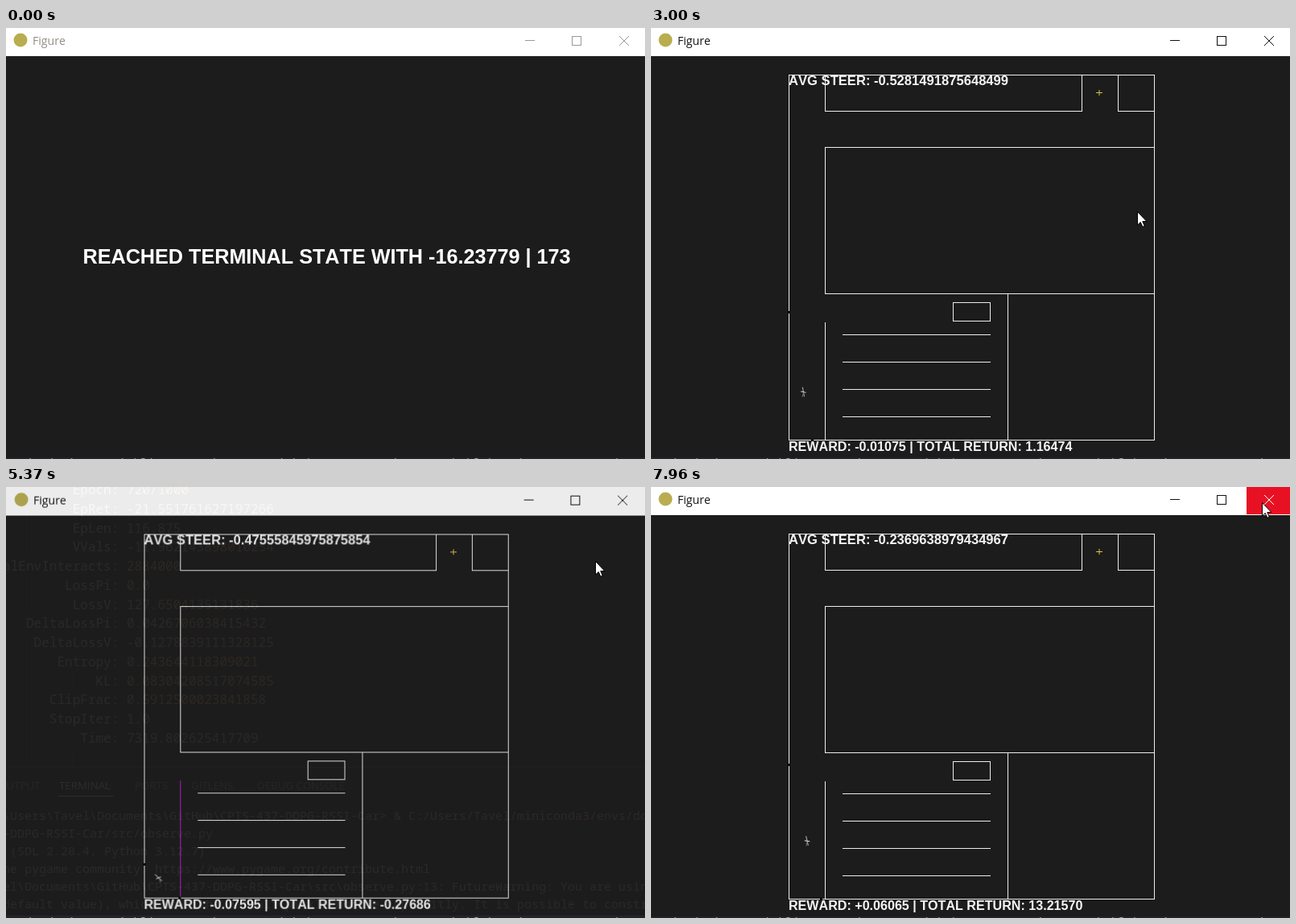
An HTML page with a canvas that plays this animation: 794 by 536 pixels, repeating every 8000 ms.

```html
<!DOCTYPE html>
<html lang="en">
<head>
<meta charset="utf-8">
<title>Figure</title>
<style>
html, body { margin: 0; width: 100%; height: 100%; overflow: hidden; background: #23272e; }
canvas { display: block; }
</style>
</head>
<body>
<canvas id="stage" width="794" height="536"></canvas>
<script>
const LOOP = 8000, STEP = 70, PAD = 8;
const W = 794, H = 536, WIN_H = 534, BAR = 35;
const ctx = document.getElementById('stage').getContext('2d');
const layer = document.createElement('canvas');
layer.width = W + 2 * PAD;
layer.height = WIN_H + PAD;
const win = layer.getContext('2d');

const MONO = '"Noto Sans Mono", "DejaVu Sans Mono", monospace';
const UI = '"Open Sans", "Noto Sans", sans-serif';
const BOLD = '"Liberation Sans", Arial, sans-serif';

const clamp = v => Math.max(0, Math.min(1, v));
const ease = u => u * u * (3 - 2 * u);
const mix = (a, b, u) => u === 1 ? b : a + (b - a) * u;

function text(g, str, x, y, font, color, align = 'left') {
  g.font = font;
  g.fillStyle = color;
  g.textAlign = align;
  g.fillText(str, x, y);
}

function line(g, x1, y1, x2, y2, color) {
  g.strokeStyle = color;
  g.lineWidth = 1;
  g.beginPath();
  g.moveTo(x1, y1);
  g.lineTo(x2, y2);
  g.stroke();
}

// ---- Editor ----
const METRICS = `Epoch: 720/1000
EpRet: -21.551761627197266
EpLen: 116.875
VVals: -11.962143898010254
TotalEnvInteracts: 2884000
LossPi: 0.0
LossV: 127.6504135131836
DeltaLossPi: 0.0426706038415432
DeltaLossV: -0.1278839111328125
Entropy: 0.243644118309021
KL: 0.08304208517074585
ClipFrac: 0.5912500023841858
StopIter: 1.0
Time: 7319.802625417709
`.split('\n').map(row => row.split(': '));

const OUTPUT = String.raw`\Users\Tavel\Documents\GitHub\CPTS-437-DDPG-RSSI-Car> &
-DDPG-RSSI-Car/src/observe.py
 (SDL 2.28.4, Python 3.12.7)
he pygame community. https://www.pygame.org/contribute.html
el\Documents\GitHub\CPTS-437-DDPG-RSSI-Car\src\observe.py:13: FutureWarning: You are using
default value), which uses the default pickle module implicitly. It is possible to construct
 code during unpickling (See https://github.com/pytorch/pytorch/blob/main/SECURITY.md#untrusted`.split('\n');

function drawMetrics() {
  const font = '16.05px ' + MONO, cell = 9.63, pitch = 23.73, colon = 150 - 2 * cell;
  METRICS.forEach(([key, value], i) => {
    const y = 9.3 + i * pitch, top = y - 17;
    const indent = key ? colon - key.length * cell : colon;
    // Indent guides show only where the row starts to their right.
    for (const [x, room] of [[25.5, 5], [82.5, 20]]) {
      if (indent > x + room) line(ctx, x, top, x, Math.min(348, top + pitch), '#3b4048');
      else if (x < 30 && indent > x + 5) line(ctx, x, top, x, top + pitch, '#3b4048');
    }
    if (!key) return;
    text(ctx, key, colon, y, font, '#abb2bf', 'right');
    text(ctx, ':', colon, y, font, '#d19a66');
    text(ctx, value, 150, y, font, '#d19a66');
  });
}

function drawEditor() {
  ctx.fillStyle = '#23272e';
  ctx.fillRect(0, 0, W, H);
  drawMetrics();

  line(ctx, 0, 348.5, W, 348.5, '#3e4452');
  const tab = (name, x, color = '#8b919c') => text(ctx, name, x, 376, '13.3px ' + UI, color);
  tab('OUTPUT', -10);
  tab('TERMINAL', 66, '#d7dae0');
  tab('PORTS', 160);
  tab('GITLENS', 230);
  tab('DEBUG CONSOLE', 312);
  line(ctx, 65, 384.5, 133, 384.5, '#d7dae0');

  const font = '15px ' + MONO;
  OUTPUT.forEach((row, i) => text(ctx, row, -4, 413.5 + i * 22, font, '#abb2bf'));
  text(ctx, 'C:/Users/Tavel/miniconda3/envs/ddpg', 500, 413.5, font, '#e8a45c');
}

// ---- Parking map, laid out on a 10 by 10 grid ----
const CELL = 45.4;
const gx = n => Math.round(170.9 + n * CELL);
const gy = n => Math.round(57.6 + n * CELL);
const row = (y, x1, x2) => [gx(x1), gy(y), gx(x2), gy(y)];
const column = (x, y1, y2) => [gx(x), gy(y1), gx(x), gy(y2)];
const box = (x1, y1, x2, y2) =>
  [row(y1, x1, x2), row(y2, x1, x2), column(x1, y1, y2), column(x2, y1, y2)];

const FLOOR = row(10, 0, 10), POST = column(1, 6.8, 10);
const WALLS = [
  ...box(0, 0, 10, 10), ...box(1, 0, 8.02, 1), ...box(9, 0, 10, 1),
  ...box(1, 2, 10, 6), ...box(4.5, 6.25, 5.5, 6.75),
  column(6, 6, 10), POST, FLOOR
];
for (let i = 0; i < 4; i++) WALLS.push(row(7.125 + 0.75 * i, 1.48, 5.5));

// Poses run from one to the next; heading is in degrees from north.
const RUNS = [
  { marked: FLOOR, unmark: 2300, end: 3710, result: '-23.96815 | 79', poses: [
    { t: 1960, x: 195, y: 481, deg: 27, steer: -0.5360690951347351, reward: 0.04707, total: 1.33388 },
    { t: 3710, x: 185, y: 430, deg: -40, steer: -0.5219264030456543, reward: -0.06148, total: 1.03185 }] },
  { marked: POST, unmark: 5700, end: LOOP, poses: [
    { t: 5370, x: 189, y: 487, deg: -46, steer: -0.47555845975875854, reward: -0.07595, total: -0.27686 },
    { t: 6560, x: 207, y: 486, deg: -10.6, steer: -0.3850700855255127, reward: 0.07905, total: 3.20287 },
    { t: 7960, x: 194, y: 440, deg: -13.6, steer: -0.2369638979434967, reward: 0.06065, total: 13.2157 }] }
];

function carState({ poses }, t) {
  const tick = Math.floor((t - poses[0].t + 5) / STEP);
  const now = poses[0].t + tick * STEP;
  const i = poses.length > 2 && now >= poses[1].t ? 1 : 0;
  const a = poses[i], b = poses[i + 1];
  const u = clamp((now - a.t) / (b.t - a.t));
  const s = {};
  for (const k in a) s[k] = mix(a[k], b[k], u);
  s.reward += 0.03 * Math.sin(Math.PI * u) * Math.sin(tick * 2.7);
  return s;
}

// Black marks where the line through the car crosses each wall.
function drawHits(x, y, angle) {
  const dx = Math.sin(angle), dy = -Math.cos(angle);
  win.fillStyle = '#000';
  for (const [x1, y1, x2, y2] of WALLS) {
    const k = x1 === x2 ? (x1 - x) / dx : (y1 - y) / dy;
    const hx = x + k * dx, hy = y + k * dy;
    const inside = x1 === x2 ? hy >= y1 && hy <= y2 : hx >= x1 && hx <= x2;
    if (inside) win.fillRect(Math.round(hx) - 1, Math.round(hy) - 1, 3, 3);
  }
}

function drawCar(x, y, angle) {
  win.save();
  win.translate(x, y);
  win.rotate(angle);
  line(win, 0, -6, 0, 6, '#b8b8b8');
  line(win, -3, -1, 3, 1.5, '#e0e0e0');
  line(win, 0, 1, -2.5, 6, '#777');
  win.restore();
}

function drawMap(run, t) {
  const { x, y, deg, steer, reward, total } = carState(run, t);
  const angle = deg * Math.PI / 180;
  const fill = ([x1, y1, x2, y2], color) => {
    win.fillStyle = color;
    win.fillRect(x1, y1, x2 - x1 + 1, y2 - y1 + 1);
  };
  for (const wall of WALLS) fill(wall, '#ececec');
  if (t < run.unmark) fill(run.marked, '#be1ebe');
  drawHits(x, y, angle);
  drawCar(x, y, angle);
  line(win, 553, 80.5, 561, 80.5, '#e0c045');
  line(win, 557, 77, 557, 84, '#e0c045');
  const sign = reward < 0 ? '-' : '+';
  text(win, 'AVG STEER: ' + steer, 171, 71, 'bold 16.6px ' + BOLD, '#f4f4f4');
  text(win, `REWARD: ${sign}${Math.abs(reward).toFixed(5)} | TOTAL RETURN: ${total.toFixed(5)}`,
    171, 526, 'bold 16.1px ' + BOLD, '#f4f4f4');
}

function drawResult(result) {
  text(win, 'REACHED TERMINAL STATE WITH ' + result, 398.5, 292.5, 'bold 25.2px ' + BOLD, '#fff', 'center');
}

// ---- Window ----
function drawBar(active, hover) {
  const ink = active ? '#111' : '#999';
  win.fillStyle = '#fff';
  win.fillRect(-PAD, -PAD, layer.width, BAR + PAD);
  win.fillStyle = '#b9ad50';
  win.beginPath();
  win.arc(18, 15, 8.5, 0, 7);
  win.fill();
  text(win, 'Figure', 33, 21, '14.1px ' + UI, active ? '#111' : '#948d84');
  line(win, 645, 15.5, 657, 15.5, ink);
  win.strokeRect(703.5, 10.5, 11, 11);
  if (hover) {
    win.fillStyle = '#e81123';
    win.fillRect(740, -PAD, 80, 34 + PAD);
  }
  const cross = hover ? '#fff' : ink;
  line(win, 762, 10, 774, 22, cross);
  line(win, 774, 10, 762, 22, cross);
}

const FADE_IN = 210, FADE_OUT = 170;
const SHOWS = [
  { open: -LOOP, close: 70, result: '-16.23779 | 173' },
  { open: 1190, close: 4540, run: RUNS[0] },
  { open: 5230, close: 2 * LOOP, run: RUNS[1] }
];

function drawWindow({ open, close, run, result }, t, hover) {
  win.setTransform(1, 0, 0, 1, PAD, PAD);
  win.fontKerning = 'none';
  win.fillStyle = '#1c1c1c';
  win.fillRect(-PAD, -PAD, layer.width, layer.height);
  drawBar(!!run, hover);
  if (!run) drawResult(result);
  else if (t < run.end) drawMap(run, t);
  else drawResult(run.result);

  const rise = clamp((t - open) / FADE_IN), fall = clamp((t - close) / FADE_OUT);
  const scale = (1 - 0.11 * (1 - rise) ** 3) * (1 - 0.08 * fall * fall);
  ctx.save();
  ctx.globalAlpha = (1 - (1 - rise) ** 2.2) * (1 - fall);
  ctx.fillStyle = 'rgba(24, 14, 20, 0.15)';
  ctx.fillRect(0, WIN_H, W, H - WIN_H);
  ctx.translate(290, 174);
  ctx.scale(scale, scale);
  ctx.drawImage(layer, -290 - PAD, -174 - PAD);
  ctx.restore();
}

// ---- Pointer: rests between trips ----
const AWAY = { x: 722, y: -30 }, CLOSE = { x: 759, y: 19 };
const TRIPS = [
  { from: 850, until: 1050, to: { x: 726, y: 84 } },
  { from: 1400, until: 1960, to: { x: 604, y: 228 } },
  { from: 3420, until: 4120, to: { x: 696, y: 187 } },
  { from: 4120, until: 4400, to: CLOSE },
  { from: 4600, until: 4900, to: AWAY },
  { from: 5100, until: 5370, to: { x: 732, y: 92 } },
  { from: 5370, until: 5790, to: CLOSE }
];
const ARROW = new Path2D('M0 0V16.5L3.8 13L6.3 18.8L8.8 17.8L6.3 12H11.4Z');

function pointerAt(t) {
  let { x, y } = AWAY;
  for (const { from, until, to } of TRIPS) {
    const u = ease(clamp((t - from) / (until - from)));
    x = mix(x, to.x, u);
    y = mix(y, to.y, u);
  }
  return { x, y };
}

function drawPointer({ x, y }) {
  ctx.save();
  ctx.translate(x + 0.5, y + 0.5);
  ctx.fillStyle = '#fff';
  ctx.fill(ARROW);
  ctx.strokeStyle = '#000';
  ctx.lineWidth = 1;
  ctx.stroke(ARROW);
  ctx.restore();
}

function draw(t) {
  const pointer = pointerAt(t);
  const hover = pointer.x >= 740 && pointer.y >= 0 && pointer.y < BAR;
  drawEditor();
  const show = SHOWS.find(s => t >= s.open && t < s.close + FADE_OUT);
  if (show) drawWindow(show, t, hover);
  drawPointer(pointer);
}

const start = performance.now();
function tick() {
  draw((performance.now() - start) % LOOP);
  requestAnimationFrame(tick);
}
tick();
</script>
</body>
</html>
```
